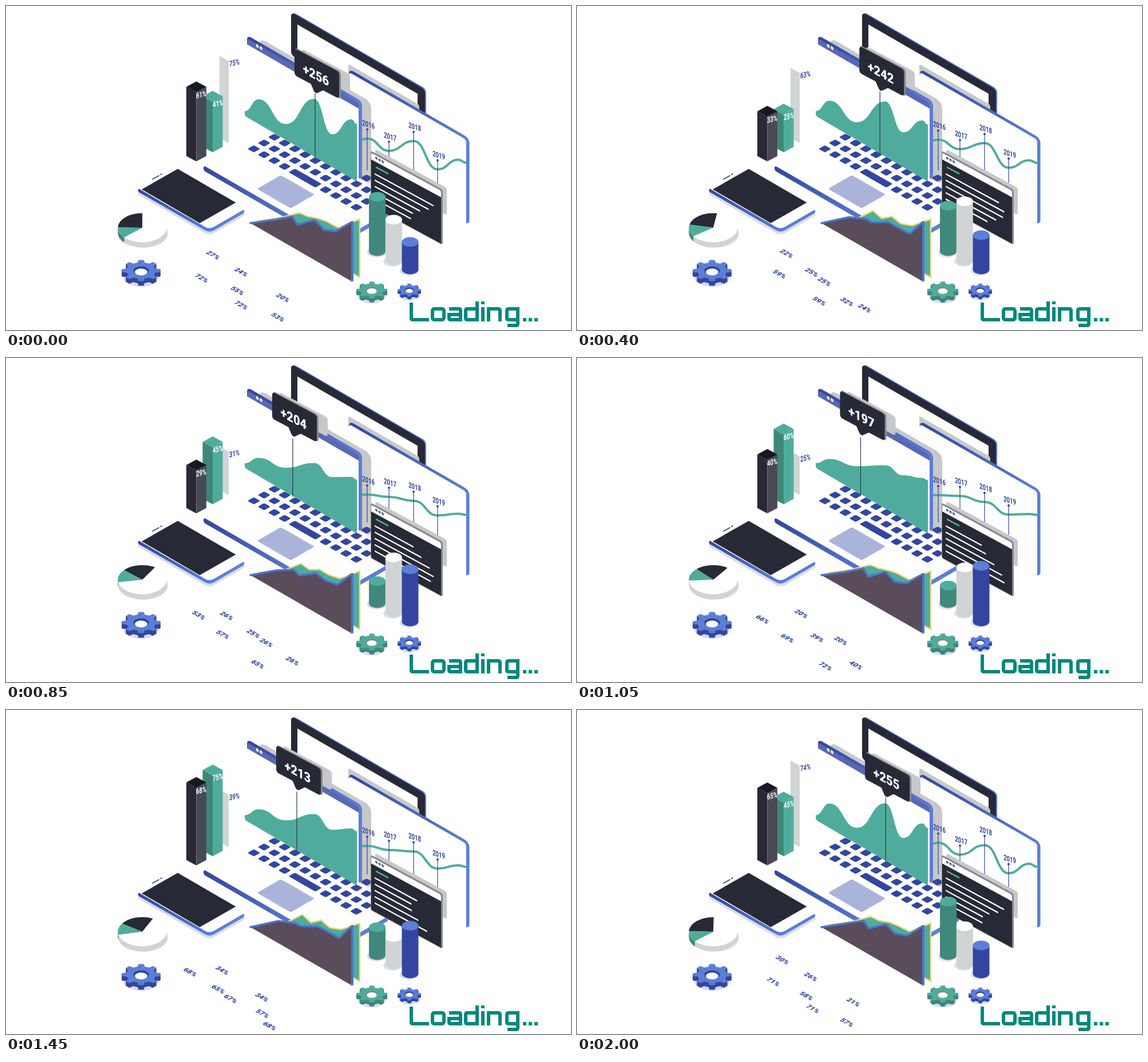
These frames come from a looping animation (987 px wide and 567 px high, 2.05 s). An HTML page:

```html
<!DOCTYPE html>
<html lang="en">
<head>
<meta charset="utf-8">
<title>Loading</title>
<style>
html, body { margin: 0; width: 100%; height: 100%; overflow: hidden; background: #fff; }
svg { display: block; width: 987px; height: 567px; }
text { text-anchor: middle; font-family: Roboto, Inter, sans-serif; font-weight: 700; }
.navy { fill: #33469f; }
.blue { fill: #5b7fd6; }
.edge { fill: url(#edge); }
.teal { fill: #4fac9c; }
.deep { fill: #3f8778; }
.ink { fill: #272936; }
.steel { fill: #87898c; }
.grey { fill: #c7c8ca; }
.pale { fill: #d0d4d4; }
.haze { fill: #d9dcf0; }
.paper { fill: #fff; }
.line { fill: none; stroke-linecap: round; stroke-linejoin: round; }
</style>
</head>
<body>
<svg viewBox="0 0 987 567">
  <defs>
    <linearGradient id="edge"><stop offset="0" stop-color="#33469f"/><stop offset="1" stop-color="#5b7fd6"/></linearGradient>
  </defs>

  <!-- back monitor -->
  <g transform="translate(498 11) skewY(30)">
    <rect class="edge" x="2" y="-2" width="234" height="75" rx="6"/>
    <rect class="ink" width="234" height="75" rx="6"/>
    <rect class="paper" x="11" y="15" width="210" height="70"/>
  </g>

  <!-- front monitor -->
  <g transform="translate(599 110) skewY(30)">
    <rect class="grey" x="-1" y="-8" width="124" height="20" rx="3"/>
    <rect class="edge" width="210.500" height="152" rx="8"/>
    <rect class="paper" y="5.500" width="205" height="160" rx="5"/>
  </g>

  <!-- laptop -->
  <g transform="translate(421 50) skewY(30)"><rect class="grey" x="22" y="-7" width="195" height="145" rx="10"/></g>
  <path id="trend" class="line" stroke="#4fac9c" stroke-width="4"/>
  <g transform="translate(345 279) skewY(30)"><rect class="edge" width="175" height="9" rx="4"/></g>
  <g transform="translate(612 393) skewY(-30)"><rect class="blue" width="56" height="8" rx="4"/></g>
  <g id="keys" class="navy" transform="matrix(.867 .495 -.867 .495 433 250)"></g>
  <g transform="matrix(.867 .5 -.867 .5 480 296)"><rect width="68" height="48" rx="3" fill="#aab3da"/></g>
  <g id="years"></g>
  <g transform="translate(421 50) skewY(30)">
    <rect class="edge" y="1" width="201" height="138" rx="7"/>
    <rect fill="#5a68b3" y="7" width="195" height="14" rx="3"/>
    <rect class="paper" x="-4" y="17" width="199" height="128"/>
    <ellipse class="paper" cx="18" cy="9.500" rx="2.300" ry="2.800"/>
    <ellipse class="paper" cx="24.500" cy="9.500" rx="2.300" ry="2.800"/>
  </g>
  <path id="wave" class="teal"/>
  <path id="marker" stroke="#283552" stroke-width="1.200"/>

  <g id="bubble">
    <g transform="translate(504 74) skewY(28)">
      <rect class="grey" x="12" y="-6" width="85" height="34" rx="5"/>
      <rect class="steel" x="1" y="-2" width="80" height="48" rx="5"/>
      <rect class="ink" width="78" height="47" rx="5"/>
      <path class="ink" d="M28 46L34 57Q37 60 40 57L51 46Z"/>
      <text id="count" fill="#fff" font-size="23" transform="scale(.87 1)" x="43" y="35" style="font-weight:900"></text>
    </g>
  </g>

  <!-- code window -->
  <g transform="translate(637 253) skewY(28.500)">
    <rect class="grey" x="8" y="-7" width="125" height="48" rx="4"/>
    <rect class="steel" width="126" height="97" rx="4"/>
    <rect class="paper" x="1" y="3.500" width="122" height="20" rx="3"/>
    <rect class="ink" x="1" y="15" width="122" height="81"/>
    <g class="navy"><circle cx="10" cy="8" r="2"/><circle cx="15.500" cy="8" r="2"/><circle cx="21" cy="8" r="2"/></g>
    <path stroke="#4fac9c" stroke-width="3" d="M9 24H31"/>
    <path id="code" stroke="#fff" stroke-width="2.600"/>
  </g>

  <g id="bars"></g>
  <g id="cylinders"></g>

  <!-- phone -->
  <g id="phone"></g>
  <path class="line" stroke="#33469f" stroke-width="1.800" d="M256 303L267 297M270 295L272 294"/>

  <!-- pie -->
  <ellipse class="haze" cx="240" cy="398" rx="43" ry="25"/>
  <path class="pale" d="M195.500 388V397A42.500 25.500 0 0 0 280.500 397V388Z"/>
  <path id="rim" class="deep"/>
  <ellipse class="paper" cx="238" cy="388" rx="42.500" ry="25.500"/>
  <path id="sliceA" class="ink"/>
  <path id="sliceB" class="teal"/>

  <!-- layered area chart -->
  <path id="back" fill="#4fac9c" stroke="#f3d97b" stroke-width="2.500"/>
  <path id="front" fill="#5b4c5c"/>
  <path id="ridge" class="line" stroke="#4b74cf" stroke-width="3.500"/>
  <path fill="#4b74cf" d="M603 378L607 376V481L603 483Z"/>

  <g id="gears"></g>
  <g id="floor" class="navy"></g>

  <g role="img" aria-label="Loading..." fill="none" stroke="#00897b" stroke-width="6">
    <path d="M708 519V546Q708 549 711 549H739M774 530H791Q794 530 794 533V549H777Q774 549 774 546V540H794M823 517V549H806Q803 549 803 546V533Q803 530 806 530H823M833 517V522M833 527V552M843 552V530H860Q863 530 863 533V552M894 549H878Q875 549 875 546V533Q875 530 878 530H894V556Q894 559 891 559H876M903 549H909M913 549H919M923 549H929"/>
    <rect x="745" y="530" width="20" height="19" rx="3"/>
  </g>
</svg>

<script>
const LOOP = 2050, STEP = 50, MAIN = 60;
const $ = id => document.getElementById(id);
const set = (el, name, value) => el.setAttribute(name, value);
const range = n => [...Array(n).keys()];

let t = 0;
const wave = (peak, turns = 1) => Math.cos(2 * Math.PI * turns * (t - peak) / LOOP);

function add(parent, tag, attrs = {}) {
  const el = document.createElementNS("http://www.w3.org/2000/svg", tag);
  for (const name in attrs) set(el, name, attrs[name]);
  return parent.appendChild(el);
}
const poly = pts => "M" + pts.map(p => p.map(n => n.toFixed(2)).join(" ")).join("L");

// Curve that eases from one crest or trough to the next
const swell = pts => "M" + pts[0] + pts.slice(1).map(([x, y], i) => {
  const [px, py] = pts[i], half = (px + x) / 2;
  return `C${half} ${py} ${half} ${y} ${x} ${y}`;
}).join("");

// Keyboard on a square floor grid, with a space bar in the front row
const PITCH = 20.65, CAP = 12.8;
for (const row of range(4)) for (const col of range(11)) {
  const space = row === 0 && col === 4;
  if (row === 0 && (col === 5 || col === 6)) continue;
  add($("keys"), "rect", {
    x: col * PITCH - CAP / 2, y: -row * PITCH - CAP / 2,
    width: CAP + (space ? 2 * PITCH : 0), height: CAP, rx: 2.5
  });
}

// Phone: stacked floor slabs, lowest first
[["haze", 11], ["edge", 6], ["paper", 0]].forEach(([cls, drop]) => add($("phone"), "rect", {
  x: -11, y: -1, width: 149, height: 75, rx: 8, class: cls, transform: `matrix(.866 .5 -.866 .5 300 ${285 + drop})`
}));
add($("phone"), "rect", { width: 117, height: 72, class: "ink", transform: "matrix(.866 .504 -.873 .5 300 285)" });

function gear(cx, cy, r, depth, top, side, inner) {
  const g = add($("gears"), "g"), squash = .55;
  const ring = y => poly(range(8).flatMap(n => [[-13, .77], [-8, 1], [8, 1], [13, .77]].map(([turn, k]) => {
    const a = (n * 45 + turn) * Math.PI / 180;
    return [cx + r * k * Math.cos(a), y + r * squash * k * Math.sin(a)];
  }))) + "Z";
  const disc = (y, k, look) => add(g, "ellipse", { cx, cy: y, rx: r * k, ry: r * k * squash, ...look });
  disc(cy + depth + 3, .92, { class: "haze" });
  for (const n of range(depth + 1)) add(g, "path", { d: ring(cy + depth - n), fill: n < depth ? side : top });
  disc(cy, .4, { fill: inner });
  disc(cy + depth * .3, .32, { class: "paper" });
}
gear(236, 463, 34, 8, "#5b7fd6", "#33469f", "#33469f");
gear(639, 497, 27, 7, "#4fac9c", "#3f8778", "#87898c");
gear(704.5, 497, 20.5, 5, "#5b7fd6", "#33469f", "#33469f");

const bars = [
  { x: 373, mid: 125, peak: 40, fills: ["#d0d4d4"], ink: "#33469f", dx: 26, dy: 17 },
  { x: 361, mid: 133, peak: 1400, foot: 256, fills: ["#3f8778", "#4fac9c", "#4fac9c"], ink: "#fff", dx: 9, dy: 27 },
  { x: 332.5, mid: 147, peak: 1670, foot: 272, fills: ["#272936", "#4a4a56", "#171922"], ink: "#fff", dx: 8.5, dy: 28 }
];
for (const b of bars) {
  b.faces = b.fills.map(fill => add($("bars"), "path", { fill }));
  b.label = add($("bars"), "text", { "font-size": 14, fill: b.ink });
}
function drawBar({ x, mid, peak, foot, faces, label, dx, dy }) {
  const top = mid - 38 * wave(peak), w = 17.5, h = 9.5;
  const shapes = foot ? [
    [[x - w, top + h], [x, top + 2 * h], [x, foot], [x - w, foot - h]],
    [[x, top + 2 * h], [x + w, top + h], [x + w, foot - h], [x, foot]],
    [[x, top], [x + w, top + h], [x, top + 2 * h], [x - w, top + h]]
  ] : [[[x, top], [x + 16, top + 9], [x + 16, 240], [x, 231]]];
  shapes.forEach((pts, i) => set(faces[i], "d", poly(pts)));
  label.textContent = Math.round(50 + 25 * wave(peak + 22)) + "%";
  set(label, "transform", `matrix(.68 -.16 0 1 ${x + dx} ${top + dy})`);
}

const cylinders = [
  { mid: 366, swing: 32.5, peak: 60, side: "#40887b", top: "#4fac9c" },
  { mid: 369, swing: 31, peak: 565, side: "#d0d4d4", top: "#fff" },
  { mid: 388.5, swing: 25, peak: 1085, side: "#33469f", top: "#5b7fd6" }
];
cylinders.forEach((c, i) => {
  c.x = 648.5 + 28.75 * i;
  c.foot = 429 + 16 * i;
  add($("cylinders"), "ellipse", { cx: c.x - 2, cy: c.foot + 2, rx: 16, ry: 9, class: "haze" });
  c.body = add($("cylinders"), "path", { fill: c.side });
  c.lid = add($("cylinders"), "ellipse", { cx: c.x, rx: 14.5, ry: 8.5, fill: c.top });
});

// Numbers lying on the floor, one row per peak time
const floor = [1275, 60, 1215, 1650, 60, 1085, 1630].map((peak, i) => ({
  peak, x: 343.5 + 23.1 * i, y: 446.5 + 15.75 * i,
  el: add($("floor"), "text", { "font-size": 13, style: "font-weight:900" })
}));

// Crests and troughs: x, middle y, swing
const trend = [[620, 237, -3], [631, 236, -4], [669, 247.5, 6], [712, 244, -8], [754, 280, 6], [790, 271, -2], [804, 274.5, 0]];
const hills = [[417, 184, 0], [441, 170, -7], [489, 198, 9], [538, 175, -13], [570, 215, 10], [603, 204, -6], [613, 210, -4]];
const pose = (keys, s) => keys.map(([x, y, swing]) => [x, y + swing * s]);

// Each year label rides above one turn of the trend
const years = range(4).map(i => {
  const g = $("years");
  const pin = add(g, "path", { stroke: "#33469f", "stroke-width": 1.2 });
  const dot = add(g, "circle", { r: 2, class: "navy" });
  const label = add(g, "text", { "font-size": 13.5, class: "navy" });
  label.textContent = 2016 + i;
  return { pin, dot, label };
});

const ridge = [[427, 380], [470, 374], [500, 368], [509, 383], [539, 374], [555, 392], [576, 394], [604, 378]];
const crest = [[440, 376], [480, 370], [512, 362], [527, 368], [545, 372], [560, 377], [580, 388], [618, 373]];
// Inner points slide right and alternate up and down
const jag = (pts, k, lift) => pts.map(([x, y], i) =>
  i % (pts.length - 1) ? [x + 7 * k, y + (i % 2 ? -lift : lift) * k] : [x, y]);

function slice(from, to, drop) {
  const at = deg => [238 + 42.5 * Math.cos(deg * Math.PI / 180), 388 - 25.5 * Math.sin(deg * Math.PI / 180)];
  const [a, b] = [at(from), at(to)], arc = "A42.5 25.5 0 0 ";
  return drop
    ? `M${a}${arc}0 ${b}v${drop}${arc}1 ${a[0]} ${a[1] + drop}Z`
    : `M238 388L${a}${arc}0 ${b}Z`;
}

function draw() {
  const s = wave(MAIN), late = wave(MAIN + 40);

  const value = 226.5 + 30 * s, x = 498 + (value - 200) * .75;
  $("count").textContent = "+" + Math.round(value);
  set($("bubble"), "transform", `translate(${(value - 256) * .75} ${(value - 256) * .29})`);
  set($("marker"), "d", `M${x} ${140 + (value - 200) * .23}V${241 + (value - 200) * .43}`);

  const turns = pose(trend, s);
  set($("trend"), "d", swell(turns));
  set($("wave"), "d", swell(pose(hills, late)) + "V303Q613 307 609 305L420 194Q417 192 417 187Z");
  years.forEach(({ pin, dot, label }, i) => {
    const [px, py] = turns[i + 1], top = py - 16;
    set(pin, "d", `M${px} ${top}V${288 + .3 * (px - 631)}`);
    set(dot, "cx", px);
    set(dot, "cy", top);
    set(label, "transform", `matrix(.7 .22 0 1 ${px + 2} ${top - 4})`);
  });

  set($("code"), "d", range(5).map(i => `M7 ${37 + 11 * i}H${90 + 20 * wave(MAIN + 256 * i)}`).join(""));

  bars.forEach(drawBar);
  for (const c of cylinders) {
    const top = c.mid - c.swing * wave(c.peak);
    set(c.body, "d", `M${c.x - 14.5} ${top}V${c.foot}a14.5 8.5 0 0 0 29 0V${top}Z`);
    set(c.lid, "cy", top);
  }

  const a = 72 + 18 * s, b = 156 + 23 * s, c = 203 + 20 * late;
  set($("sliceA"), "d", slice(a, b));
  set($("sliceB"), "d", slice(b, c));
  set($("rim"), "d", slice(Math.max(180, b), Math.max(180, c), 9));

  const k = .5 - .5 * wave(MAIN, 2), low = jag(ridge, k, 6), high = jag(crest, k, -5);
  set($("back"), "d", poly([...high, [618, 475], [440, 377]]) + "Z");
  set($("front"), "d", poly([...low, [604, 482]]) + "Z");
  set($("ridge"), "d", poly(low));

  for (const f of floor) {
    const shift = 26.3 * wave(f.peak);
    f.el.textContent = Math.round(45.7 + shift) + "%";
    set(f.el, "transform", `matrix(.83 .48 -.75 .5 ${f.x - .96 * shift - 3} ${f.y + .55 * shift + 2})`);
  }
}

function tick() {
  t = Math.floor(performance.now() % LOOP / STEP) * STEP;
  draw();
  requestAnimationFrame(tick);
}
tick();
</script>
</body>
</html>
```
